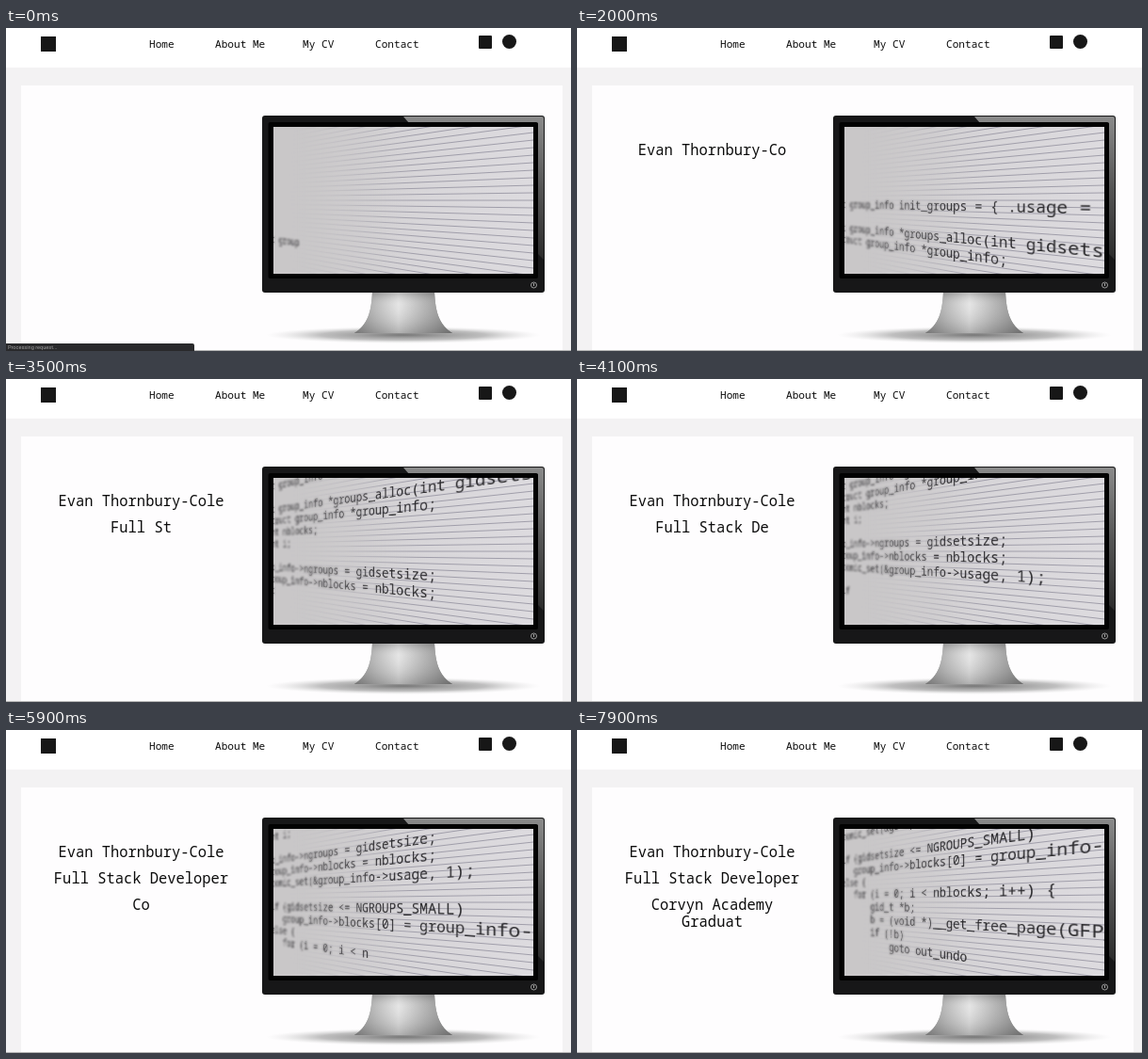
An HTML page that plays this animation: 600 px wide and 343 px high, repeating every 8 s.

```html
<!DOCTYPE html>
<html lang="en">
<head>
<meta charset="utf-8">
<title>Portfolio</title>
<style>
html, body { margin: 0; width: 100%; height: 100%; overflow: hidden; }
body { position: relative; background: #f3f2f3; color: #0c0c0c; font-family: "Noto Sans Mono", "DejaVu Sans Mono", monospace; font-weight: 500; }
body > *, #screen > * { position: absolute; }
header { left: 0; top: 0; width: 100%; height: 42px; background: #fff; }
header * { position: absolute; }
header a { top: 9px; font-size: 11.1px; line-height: 16px; white-space: pre; }
header i { background: #171717; }
#panel { left: 16px; top: 61px; width: 575px; bottom: 0; background: #fefdfe; }
.line { left: 46.5px; width: 194px; font-size: 15.45px; line-height: 17.5px; text-align: center; }
#art { left: 0; top: 0; }
#screen { left: 284px; top: 105px; width: 276px; height: 156px; overflow: hidden; background: linear-gradient(90deg, #c9c7c8, #d6d4d7 45%, #dddbdf); }
#fade { inset: 0; background: linear-gradient(90deg, #c9c7c8 5%, #cdcbcc99 25%, #d6d4d700 55%); }
#code { left: 0; top: 0; margin: 0; font: 500 20px/23px "Noto Sans Mono", "DejaVu Sans Mono", monospace; color: #29282b; transform-origin: 0 0; }
#blur { inset: 0 auto 0 0; width: 120px; backdrop-filter: blur(1.2px); -webkit-mask: linear-gradient(90deg, #000 20%, #0000); mask: linear-gradient(90deg, #000 20%, #0000); }
#rule { left: 0; right: 0; top: 342px; height: 1px; background: #b4b4b4; }
#status { left: 0; top: 335px; width: 200px; height: 8px; border-radius: 0 2px 0 0; background: #29292b; color: #a0a0a0; font: 5.6px/9px Roboto, sans-serif; text-indent: 2px; }
</style>
</head>
<body>
<header>
  <i style="left:37px;top:9px;width:16px;height:16px"></i>
  <a style="left:152px">Home</a>
  <a style="left:222px">About Me</a>
  <a style="left:315px">My CV</a>
  <a style="left:392px">Contact</a>
  <i style="left:502px;top:8px;width:14px;height:14px;border-radius:1px"></i>
  <i style="left:527px;top:7px;width:15px;height:15px;border-radius:50%"></i>
</header>
<div id="panel"></div>
<div class="line" style="top:120.5px"></div>
<div class="line" style="top:149px"></div>
<div class="line" style="top:177px"></div>

<svg id="art" width="600" height="343">
  <defs>
    <linearGradient id="steel">
      <stop offset="0" stop-color="#858585"/><stop offset=".22" stop-color="#b5b5b5"/>
      <stop offset=".45" stop-color="#e2e2e2"/><stop offset=".7" stop-color="#b0b0b0"/>
      <stop offset="1" stop-color="#777"/>
    </linearGradient>
    <linearGradient id="shade" x2="0" y2="1">
      <stop offset="0" stop-color="#444" stop-opacity=".3"/><stop offset=".3" stop-color="#fff" stop-opacity=".1"/>
      <stop offset="1" stop-color="#555" stop-opacity=".35"/>
    </linearGradient>
    <linearGradient id="gloss" x2="0" y2="1">
      <stop offset="0" stop-color="#8a8a8a"/><stop offset=".5" stop-color="#555"/>
      <stop offset="1" stop-color="#2b2b2b"/>
    </linearGradient>
    <radialGradient id="shadow">
      <stop offset="0" stop-color="#777"/><stop offset=".6" stop-color="#aaa" stop-opacity=".75"/>
      <stop offset="1" stop-color="#ddd" stop-opacity="0"/>
    </radialGradient>
  </defs>
  <ellipse cx="422" cy="326" rx="146" ry="9" fill="url(#shadow)"/>
  <g id="stand">
    <path id="foot" d="M389 280H455C456 302 460 315 474 324H370C384 315 388 302 389 280Z" fill="url(#steel)"/>
    <use href="#foot"/>
    <path d="M389 280H455C456 302 460 315 474 324H370C384 315 388 302 389 280Z" fill="url(#shade)"/>
  </g>
  <rect x="272" y="93" width="300" height="188" rx="3" fill="#171718"/>
  <path d="M422 94H569Q571 94 571 96V246L565 240V101H428Z" fill="url(#gloss)"/>
  <rect x="278.500" y="100" width="286.500" height="166" rx="2" fill="#020202"/>
  <circle cx="560.500" cy="273" r="3" fill="none" stroke="#bbb" stroke-width=".8"/>
  <path d="M560.500 271V274" stroke="#ccc" stroke-width=".8"/>
</svg>
<div id="screen">
  <svg width="276" height="156"><path id="scan" stroke="#a09eaa"/></svg>
  <div id="fade"></div>
  <pre id="code"></pre>
  <div id="blur"></div>
</div>
<div id="rule"></div>
<div id="status">Processing request...</div>

<script>
const $ = id => document.getElementById(id);
const titles = [
  ["Evan Thornbury-Cole", 300],
  ["Full Stack Developer", 2800],
  ["Corvyn Academy Graduate", 5700]
];
const lines = document.querySelectorAll(".line");
const source = `struct group_info init_groups = { .usage = ATOMIC_INIT(2) };     

struct group_info *groups_alloc(int gidsetsize)
    struct group_info *group_info;
    int nblocks;
    int i;

 group_info->ngroups = gidsetsize;
    group_info->nblocks = nblocks;
    atomic_set(&group_info->usage, 1);

     if (gidsetsize <= NGROUPS_SMALL)
        group_info->blocks[0] = group_info->small_block;
     else {
        for (i = 0; i < nblocks; i++) {
            gid_t *b;
            b = (void *)__get_free_page(GFP_USER);
            if (!b)
                goto out_undo_partial_alloc;`.split("\n");

// Scan lines fan out from the same vanishing point as the code.
let fan = "";
for (let i = -19; i < 20; i++) fan += `M0 ${78 + i * 4.28}L276 ${78 + i * 8}`;
$("scan").setAttribute("d", fan);
const plane = "matrix3d(.307,-.0756,0,-.000969, 0,.5,0,0, 0,0,1,0, -20.5,78,0,1)";

function draw(t) {
  titles.forEach(([text, start], i) => {
    lines[i].textContent = text.slice(0, Math.max(0, (t - start) / 100));
  });

  // The line being typed stays at a fixed height; each new line pushes the rest up.
  let left = 12 + t * 0.0668;
  const typed = [];
  for (const line of source) {
    typed.push(line.slice(0, Math.min(50, Math.ceil(left))));
    left -= line.length;
    if (left < 0) break;
  }
  $("code").textContent = typed.join("\n");
  $("code").style.transform = `${plane} translateY(${65 - 23 * (typed.length - 1)}px)`;
  $("status").style.display = t < 400 ? "" : "none";
}

const begin = performance.now();
function tick() {
  const t = (performance.now() - begin) % 8000;
  draw(Math.floor(t / 100) * 100);
  requestAnimationFrame(tick);
}
tick();
</script>
</body>
</html>
```
